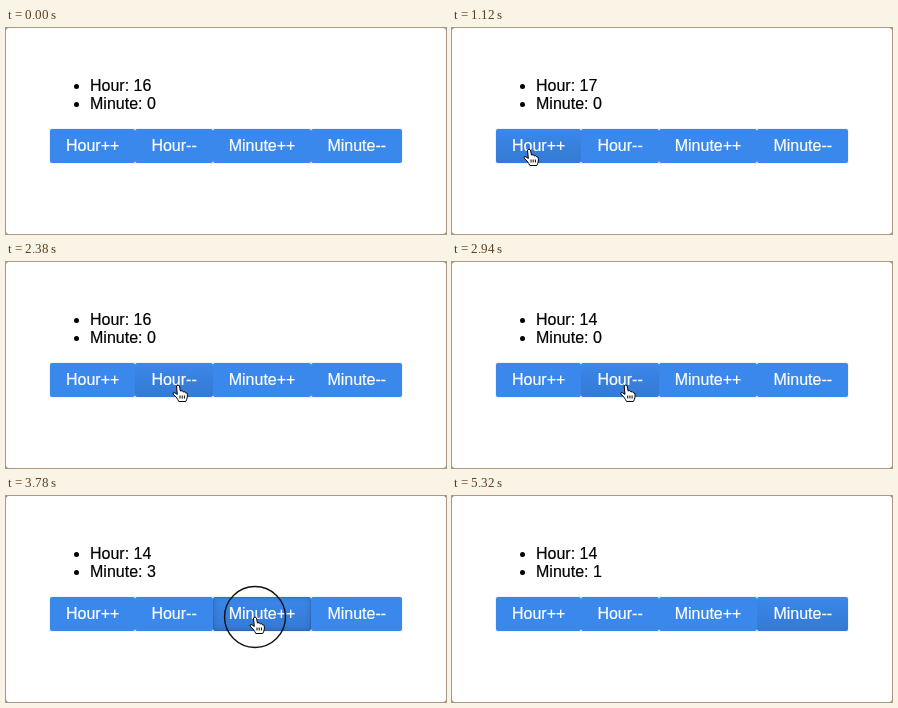
An HTML page for the animation above (5.46 s loop, 440x206 px).

```html
<!DOCTYPE html>
<html lang="en">
<head>
<meta charset="utf-8">
<title>Hour and minute counters</title>
<style>
  html, body { margin: 0; width: 100%; height: 100%; overflow: hidden; background: #888; }
  body { position: relative; font: 16px/18px "Liberation Sans", Arial, sans-serif; color: #000; -webkit-text-stroke: .2px; }
  #page { position: absolute; width: 440px; height: 206px; background: #fff; border-radius: 3px; }
  ul { position: absolute; left: 84px; top: 49px; margin: 0; padding: 0; list-style: none; }
  li { position: relative; white-space: nowrap; }
  li::before {
    content: ""; position: absolute; left: -16px; top: 7px;
    width: 5px; height: 5px; border-radius: 50%; background: #000;
  }
  #buttons { position: absolute; left: 44px; top: 101px; display: flex; border-radius: 2px; box-shadow: 0 0 1px #5a8fc0; }
  #buttons span {
    padding: 8px 16px; border-radius: 2px; color: #fff; white-space: nowrap;
    background: linear-gradient(transparent, rgba(0,0,0,calc(.05 * var(--shade))) 40%, rgba(0,0,0,calc(.1 * var(--shade)))) #3b88ec;
  }
  #buttons .active { box-shadow: inset 0 0 0 1px rgba(0,0,0,.08), inset 0 0 6px rgba(0,0,0,.2); }
  svg { position: absolute; left: 0; top: 0; }
</style>
</head>
<body>
<div id="page">
  <ul>
    <li>Hour: <span id="hour"></span></li>
    <li>Minute: <span id="minute"></span></li>
  </ul>
  <div id="buttons"><span>Hour++</span><span>Hour--</span><span>Minute++</span><span>Minute--</span></div>
  <svg width="440" height="206">
    <g id="pointer">
      <circle id="ring" fill="none" stroke="#111" stroke-width="1.4"/>
      <path id="arrow" stroke="#fff" d="M0 0V15.5L3.6 12.2 6 17.5 8.4 16.5 6.1 11.3H11Z"/>
      <path id="hand" fill="#fff" stroke="#000" stroke-linejoin="round"
        d="M-1.5 1Q0-1 1.5 1L2.4 6Q4.3 5 5.2 6.8 7 6.2 7.6 7.8 9.3 7.6 9.3 9.2V12Q9 14.3 7.8 16.5H.8Q0 14.5-2 12L-5 9Q-5.2 7-3 7.8L-.7 9.5ZM2 10.5v3M4.2 10.5v3M6.4 10.5v3"/>
    </g>
  </svg>
</div>
<script>
const LOOP = 5460, STEP = 70, RING = 140, FOCUS_CLICK = 700;
const OUTSIDE = { x: 350, y: 208 };
const el = id => document.getElementById(id);
const buttons = [...el("buttons").children];

// One visit per button, then the way out
const visits = [
  { leave: 270, arrive: 720, x: 77, y: 121, click: 980, gap: 245, count: 3 },
  { leave: 1510, arrive: 1680, x: 172, y: 123, click: 1820, gap: 190, count: 5 },
  { leave: 2910, arrive: 3080, x: 249, y: 121, click: 3070, gap: 290, count: 3 },
  { leave: 3960, arrive: 4270, x: 365, y: 114, click: 4340, gap: 140, count: 2 },
  { leave: 5010, arrive: 5320, x: 250, y: 208, count: 0 }
];
const clicks = visits.flatMap((v, i) =>
  Array.from({ length: v.count }, (_, n) => ({ start: v.click + n * v.gap, button: i })));

const clamp = k => Math.min(1, Math.max(0, k));
const ease = k => k < .5 ? 4 * k ** 3 : 1 - 4 * (1 - k) ** 3;
const hoverStart = i => i ? (visits[i].leave + visits[i].arrive) / 2 : visits[0].arrive;

function position(t) {
  let { x, y } = OUTSIDE;
  for (const v of visits) {
    const k = ease(clamp((t - v.leave) / (v.arrive - v.leave)));
    x += (v.x - x) * k;
    y += (v.y - y) * k;
  }
  return { x, y };
}

// A button darkens at once and fades after the pointer has moved to the next one
function shade(i, t) {
  if (t < hoverStart(i)) return 0;
  return i + 1 < buttons.length ? 1 - clamp((t - hoverStart(i + 1)) / RING) : 1;
}

function ringRadius(t) {
  if (t >= FOCUS_CLICK && t < FOCUS_CLICK + RING) return 22;
  const click = clicks.find(c => t >= c.start && t < c.start + RING);
  return click ? 22 + 8.5 * Math.sin((t - click.start) / RING * Math.PI / 2) : 0;
}

function total(first, second, t) {
  const done = i => clicks.filter(c => c.button === i && t >= c.start + RING / 2).length;
  return done(first) - done(second);
}

const show = (node, on) => node.setAttribute("visibility", on ? "visible" : "hidden");

function draw(t) {
  el("hour").textContent = 16 + total(0, 1, t);
  el("minute").textContent = total(2, 3, t);

  const { x, y } = position(t), r = ringRadius(t);
  const hovered = buttons.filter((_, i) => t >= hoverStart(i)).length - 1;
  buttons.forEach((b, i) => {
    b.style.setProperty("--shade", shade(i, t));
    b.classList.toggle("active", i === hovered && r > 0);
  });

  const visible = t >= 280 && t < 5320, isHand = hovered >= 0 && y < 135;
  el("pointer").setAttribute("transform", `translate(${x} ${y})`);
  el("ring").setAttribute("r", r);
  show(el("ring"), visible && r > 0);
  show(el("arrow"), visible && !isHand);
  show(el("hand"), visible && isHand);
}

function tick() {
  draw(Math.floor((performance.now() % LOOP) / STEP) * STEP);
  requestAnimationFrame(tick);
}
tick();
</script>
</body>
</html>
```
